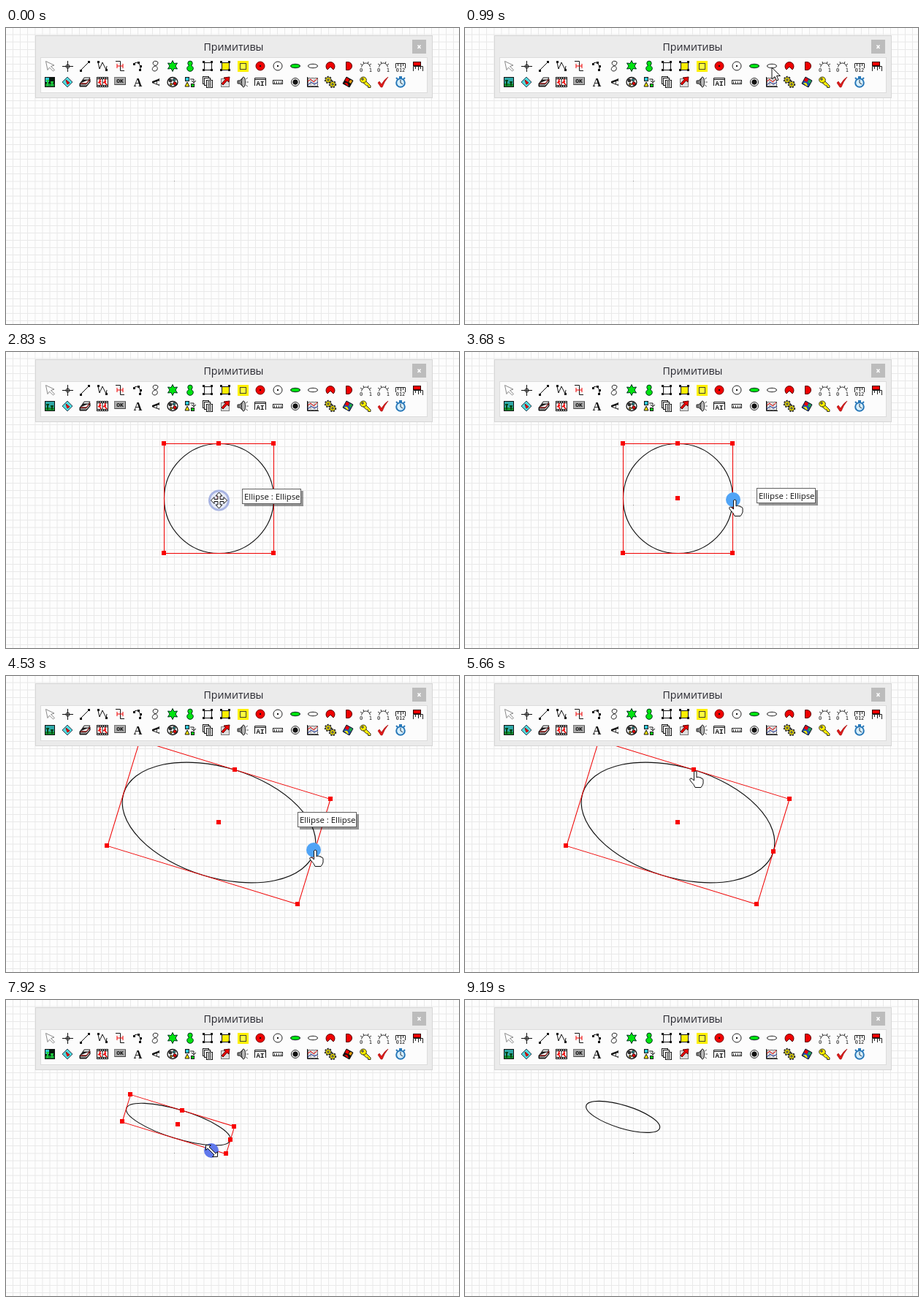
Recreate the animation shown at these times as an HTML page with a canvas. Size 620x405 px, loop 9.29 s.

```html
<!DOCTYPE html>
<html lang="ru">
<meta charset="utf-8">
<title>Примитивы</title>
<style>
  html, body { margin: 0; width: 100%; height: 100%; overflow: hidden; background: #fdfdfd }
  canvas { display: block }
</style>
<canvas id="stage" width="620" height="405"></canvas>
<script>
const c = document.getElementById('stage').getContext('2d');
const LOOP = 9290, STEP = 141.4;
const UI = '"Open Sans", "Noto Sans", sans-serif';
const RED = '#f00000', GREEN = '#00e410', YELLOW = '#fff000';

// ---------- drawing helpers ----------
function path(d, fill, stroke = '#111', width = 1) {
  const p = new Path2D(d);
  if (fill) { c.fillStyle = fill; c.fill(p); }
  if (stroke) { c.strokeStyle = stroke; c.lineWidth = width; c.stroke(p); }
}
function oval(x, y, rx, ry, fill, stroke = '#111', width = 1) {
  c.beginPath();
  c.ellipse(x, y, rx, ry, 0, 0, 7);
  if (fill) { c.fillStyle = fill; c.fill(); }
  if (stroke) { c.strokeStyle = stroke; c.lineWidth = width; c.stroke(); }
}
function box(x, y, w, h, fill, stroke) {
  c.fillStyle = fill;
  c.fillRect(x, y, w, h);
  if (stroke) {
    c.strokeStyle = stroke;
    c.lineWidth = 1;
    c.strokeRect(x + .5, y + .5, w - 1, h - 1);
  }
}
function text(s, x, y, font, fill = '#111', align = 'center') {
  c.font = font;
  c.fillStyle = fill;
  c.textAlign = align;
  c.fillText(s, x, y);
}
function dots(...xy) {
  for (let i = 0; i < xy.length; i += 2) box(xy[i] - 1, xy[i + 1] - 1, 3, 3, '#111');
}
function at(x, y, draw, angle = 0) {
  c.save();
  c.translate(x, y);
  c.rotate(angle);
  draw();
  c.restore();
}

// ---------- toolbar icons, each centred on 0,0 ----------
function framed(fill) {
  box(-5, -5, 11, 11, fill, '#111');
  dots(-6, -6, 5, -6, -6, 5, 5, 5);
}
function gauge() {
  path('M-5.5 1.5Q-4-4 .5-4T6.5 1.5M-7-3L-4-1M-3-6L-2-3M4-6L3-3M8-3L5-1', null, '#333');
  text('0  1', .5, 8, '7px "DejaVu Sans Mono", monospace');
}
const ruler = 'M-6.5 3V-3.5H6.5V3M-3.5-3V0M.5-3V2M3.5-3V0';

const tools = [
  () => path('M-5.5-6.5L6-1 1.5 .5 6.5 5.5 4.5 7-.5 2-3 5.5Z', '#fff', '#888'),
  () => { oval(.5, .5, 2.5, 2.5, '#fff'); path('M-7 .5H8M.5-7V8'); },
  () => { path('M-6 6L6-6'); dots(-6, 6, 5, -6); },
  () => { path('M-6-5L-4 4 0-5 5 5 6 0'); dots(-6, -6, 5, 5); },
  () => { path('M-6-6.5H.5V6.5H6'); path('M-4-3V3M4-3V3M-4 0H4', null, RED); },
  () => { path('M-6-2Q0-9 4 .5V6'); dots(-5, -3, 1, -5, 4, 0, 3, 5); },
  () => path('M3-6C-3-9-5-2 0-.5 5 1 4 7-1 7-5 6-4 3-2 1Q4-1 4-4 4-6 3-6', null, '#222'),
  () => path('M0-7.5L2-3.5 6.5-4 4 0 6.5 4 2 3.5 0 7.5-2 3.5-6.5 4-4 0-6.5-4-2-3.5Z', GREEN, '#032'),
  () => { oval(0, 3.3, 4.3, 4, GREEN, '#032'); oval(0, -3.7, 3.2, 3.2, GREEN, '#032');
          box(-1, -2, 2, 3, GREEN); },
  () => framed('#fff'),
  () => framed(YELLOW),
  () => { box(-7, -7, 15, 15, YELLOW); box(-4, -4, 9, 9, '#ffff40', '#443'); },
  () => { oval(0, 0, 6, 6, RED, '#700'); box(-1, -1, 2, 2, '#111'); },
  () => { oval(0, 0, 6, 6, '#fff', '#222'); box(-1, -1, 2, 2, '#111'); },
  () => oval(0, 0, 6.5, 2.7, GREEN, '#122'),
  () => oval(0, 0, 6.5, 2.7, '#fff', '#222'),
  () => path('M0 1L-4 5A6 6 0 1 1 4 5Z', RED, '#500'),
  () => path('M-2.5-5.5H0A5.5 5.5 0 0 1 0 5.5H-2.5Z', RED, '#500'),
  gauge,
  gauge,
  () => { path(ruler, null, '#222'); text('012', 0, 8, '7px "DejaVu Sans Mono", monospace'); },
  () => { box(-7, -6, 11, 6, RED, '#300'); at(0, 4, () => path(ruler, null, '#222')); },

  k => {
    const dark = k < 6 || k > 53 && k < 60, green = k > 7 && k < 16 || k > 44 && k < 50;
    box(-7, -7, 14, 14, dark ? '#081810' : green ? '#18b048' : '#30a8a8', '#111');
    box(-6, 2, 12, 4, '#149030');
    if (dark) box(-6, -6, 5, 6, '#30c8d0');
    path('M-3-3V5M3-1V5M-5-2H-1M1 0H5', null, dark ? '#20d040' : '#064818', 2);
  },
  () => { path('M0-7L7 0 0 7-7 0Z', '#50d8dc', '#345'); path('M-2-3L3 1 0 3Z', RED, '#a00'); },
  () => { path('M-7 2L-2-4H7L2 2ZM-7 2V6H2L7 0V-4', '#222'); path('M-6 4H2L6-1', null, '#fff');
          path('M-1-6H7L5-3H-3Z', '#fff'); path('M-6 2H2L7-4', null, '#c01010'); },
  () => { box(-8, -7, 16, 14, '#111'); box(-7, -4, 14, 8, '#fff');
          for (let x = -7; x < 7; x += 3) { box(x, -6, 2, 1, '#fff'); box(x, 5, 2, 1, '#fff'); }
          path('M-3-4L-4 0-2 4M-6 1L-2-1M4-4L3 0 6 4M1 1L5-1', null, RED, 1.6); path('M0-4V4'); },
  () => { box(-8, -7, 16, 11, '#aaa', '#777'); path('M-7 3.5H7.5V-6', null, '#444');
          text('OK', 0, 1, 'bold 8px "Liberation Mono", monospace'); },
  () => text('A', .5, 6, 'bold 16px "Liberation Serif", serif'),
  () => at(0, 0, () => text('A', 0, 6, 'bold 15px "Liberation Serif", serif'), -Math.PI / 2),
  () => { oval(0, 0, 7, 6.5, '#fff', '#111', 1.3); oval(-3, -2, 2, 2, '#333'); oval(2, -3, 2, 1.5, '#3aa');
          oval(3, 2, 2.3, 2.3, RED); oval(-2, 3, 1.5, 1.5, '#e8c020'); },
  () => { box(-7, -7, 6, 6, '#30c8d8', '#111'); path('M0-4H5V0M2-2L5 1 8-2'); box(1, 2, 5, 5, GREEN, '#111');
          path('M-4 0L-1 6H-7Z', YELLOW); },
  () => { for (const d of [-3, -1, 2]) box(d - 4, d - 5, 9, 11, '#fff', '#111');
          path('M0-.5H5M0 1.5H5M0 3.5H5M0 5.5H5', null, '#222'); },
  () => { box(-6, -5, 12, 12, '#ddd', '#777'); path('M6-7L5 0 2.5-2-3 4-5 2 .5-4-2-6Z', RED, '#500'); },
  () => { path('M-7-2H-4L1-7V7L-4 2H-7Z', '#888', '#222'); oval(1, 0, 2.5, 7, '#bbb', '#222');
          path('M4-4L7-6M5 0H8M4 4L7 6', null, '#666'); },
  () => { path('M-7.5 5V-5.5H7.5V5M-7-3.5H7'); text('AI', 0, 5, 'bold 9px "Liberation Mono", monospace'); },
  () => { box(-7, -3, 14, 6, '#fff', '#222'); path('M-4.5-1V2M-1.5-1V2M1.5-1V2M4.5-1V2', null, '#333'); },
  () => { oval(0, 0, 5.5, 5.5, '#fff', '#222'); oval(0, 0, 3.2, 3.2, '#111'); },
  () => { box(-7, -6, 14, 12, '#eee', '#666'); path('M-7-2H7M-7 2H7M-3-6V6M2-6V6', null, '#aaa');
          path('M-7-1L-3-4 1 0 6-5', null, RED); path('M-7 4L-2 0 2 3 7 0', null, '#2038a0');
          path('M-7.5-7V6.5H8'); },
  () => { for (const [x, y] of [[-3, -3], [3, 3]]) {
            c.setLineDash([2, 1.4]); oval(x, y, 4, 4, null, '#222', 2.4); c.setLineDash([]);
            oval(x, y, 3.5, 3.5, YELLOW, '#443'); oval(x, y, 1.2, 1.2, '#fff'); } },
  k => {
    const dark = k < 6 || k > 53 && k < 60;
    path('M-2-7L7-2 2 7-7 2Z', dark ? '#111' : '#2050b0');
    path('M-2-6L2-4 0 0-4-2Z', RED, null);
    path('M3-3L6-2 4 2 1 0Z', dark ? '#e8a010' : '#20b040', null);
    path('M-5 1L-1 1 1 5-1 5Z', dark ? RED : YELLOW, null);
  },
  () => { path('M0-2L7 5V7.5H3.5V5H1.5L-3 1', YELLOW, '#332'); oval(-3, -3, 4.3, 4, YELLOW, '#332');
          oval(-4, -4, 1.2, 1.2, '#fff'); },
  () => path('M-7 1L-5-1-2 3Q2-4 7-7 2-1-1 7H-3Z', '#e01818', '#900', .6),
  () => { box(-2, -8, 4, 3, '#2878b8'); oval(0, 1, 5.8, 5.8, '#d8f0ff', '#2878b8', 2);
          path('M0-3V1L3 3', null, '#234'); path('M-6-6L-4-4M6-6L4-4', null, '#2878b8', 2); },
];

function panel(k) {
  const active = k > 7 && k < 16;
  box(40, 10, 544, 86, active ? '#d8d8d8' : '#ebebeb', active ? '#a8a8a8' : '#d6d6d6');
  box(47, 40, 530, 49, '#fcfcfc', active ? '#c4c4c4' : '#dcdcdc');
  text('Примитивы', 311.5, 31, '14.2px ' + UI, '#282830');
  box(556, 16, 19, 19, active ? '#bf5048' : '#bcbcbc');
  path('M563.5 23.5L567.5 28M567.5 23.5L563.5 28', null, '#fff', 1.5);
  tools.forEach((draw, i) => at(60 + 24 * (i % 22), i < 22 ? 52 : 74, () => draw(k)));
}

// Grid pitch is slightly over 10, so lines midway between two pixels blur
function snap(v) {
  const r = Math.round(v);
  return Math.abs(v - r) < .4 ? r : v;
}
function grid() {
  const pitch = 10.0455;
  box(0, 0, 620, 405, '#fdfdfd');
  for (let i = 0; i < 62; i++) {
    box(snap(i * pitch - .77), 0, 1, 405, '#e9e9e9');
    box(0, snap(i * pitch + 8.52), 620, 1, '#e9e9e9');
  }
  box(230, 209, 1, 1, '#999');
}

// ---------- motion ----------
// Linear interpolation over rows of [step, value, value, ...]
function track(rows, k) {
  let i = rows.findIndex(r => r[0] > k);
  if (i < 0) return rows[rows.length - 1].slice(1);
  if (i === 0) return rows[0].slice(1);
  const a = rows[i - 1], b = rows[i], f = (k - a[0]) / (b[0] - a[0]);
  return a.slice(1).map((v, j) => v + (b[j + 1] - v) * f);
}
const pointer = [
  [2, 470, 250], [7, 420, 54], [8, 420, 54], [13, 291, 203], [20, 291, 203], [24, 367, 202],
  [26, 367, 202], [31, 421, 238], [35, 421, 238], [40, 313, 130], [44, 301, 171], [47, 395, 245],
  [48, 410, 268], [49, 410, 268], [56, 281, 206], [57.3, 258, 195], [59, 258, 195],
  [62, 330, 290], [64, 400, 420]];
// half axes and angle
const shape = [
  [26, 75, 75, 0], [31, 136.5, 75.3, .2975], [40, 136.5, 75.3, .2975], [44, 136.5, 31.5, .2975],
  [49, 136.5, 31.5, .2975], [56, 74.4, 19.6, .2975], [58, 52.6, 15.7, .2975]];

function ellipse(k, [mx, my]) {
  if (k < 9) return;
  const [a, b, angle] = track(shape, k);
  const cos = Math.cos(angle), sin = Math.sin(angle);
  let x = 291, y = 200;
  if (k < 13) {
    x = Math.floor((mx - 1) / 10) * 10 + 1;
    y = Math.floor(my / 10) * 10;
  } else if (k > 49) { // top left corner stays fixed
    x = 170 + a * cos - b * sin;
    y = 129 + a * sin + b * cos;
  }
  const selected = k > 15 && k < 62;
  at(x + .5, y + .5, () => {
    oval(0, 0, a, b, null, '#111', 1.15);
    if (selected) {
      c.strokeStyle = RED;
      c.lineWidth = 1;
      c.strokeRect(-a, -b, 2 * a, 2 * b);
    }
  }, angle);
  if (!selected) return;
  for (const [u, v] of [[-1, -1], [0, -1], [1, -1], [1, 0], [1, 1], [-1, 1], [0, 0]]) {
    const hx = x + u * a * cos - v * b * sin, hy = y + u * a * sin + v * b * cos;
    box(Math.round(hx) - 3, Math.round(hy) - 3, 6, 6, '#f80000');
  }
}

function tooltip(k) {
  const x = k > 17 && k < 22 ? 323 : k > 24 && k < 35 ? 399 : 0;
  if (!x) return;
  const y = x === 323 ? 187 : 186;
  box(x + 3, y + 3, 81, 21, 'rgba(0,0,0,.4)');
  box(x, y, 81, 21, '#fff', '#606060');
  text('Ellipse : Ellipse', x + 3, y + 15, '11.4px ' + UI, '#111', 'left');
}

const held = k => k === 8 || k === 14 || k === 19 || k > 24 && k < 35 || k > 40 && k < 45 ||
  k > 48 && k < 59 || k === 62;

function cursor(k, [x, y]) {
  if (k < 2 || k > 63) return;
  if (held(k)) oval(x, y, 10, 10, k > 48 ? '#6078ec' : '#50a4f6', null);
  else if (held(k - 1)) oval(x + .5, y, 13, 13, 'rgba(225,230,248,.8)', '#a8b4e2', 3);
  at(x, y, () => {
    if (k > 8 && k < 16) path('M0-12V12M-12 0H12', null, '#000', 2);
    else if (k > 15 && k < 23)
      path('M.5-11L5-6H2V-1.5H7V-4.5L11.5 0 7 4.5V1.5H2V6H5L.5 11-4 6H-1V1.5H-6V4.5L-10.5 0-6-4.5V-1.5H-1V-6H-4Z', '#fff');
    else if (k > 22 && k < 48)
      path('M.5 1Q2-1 4 1V9Q6 7 8 9 10 8 10 10 12 9 13 12V17Q12 20 10 22.5H2Q1 19-4 14-7 10-3 10L.5 13Z', '#fff');
    else if (k > 47 && k < 59)
      path('M-7.5-7.5H-.5L-3-5 6 4 8.5 1.5V8.5H1.5L4 6-5-3-7.5-.5Z', '#fff');
    else path('M0 0V16L4 12.5 6.5 18 9 17 6.5 11.5H11.5Z', '#fff');
  });
}

let shown = -1;
function frame() {
  const k = Math.floor((performance.now() % LOOP + 6) / STEP);
  if (k !== shown) {
    shown = k;
    const tip = track(pointer, k);
    grid();
    ellipse(k, tip);
    panel(k);
    cursor(k, tip);
    tooltip(k);
  }
  requestAnimationFrame(frame);
}
frame();
</script>
</html>
```
